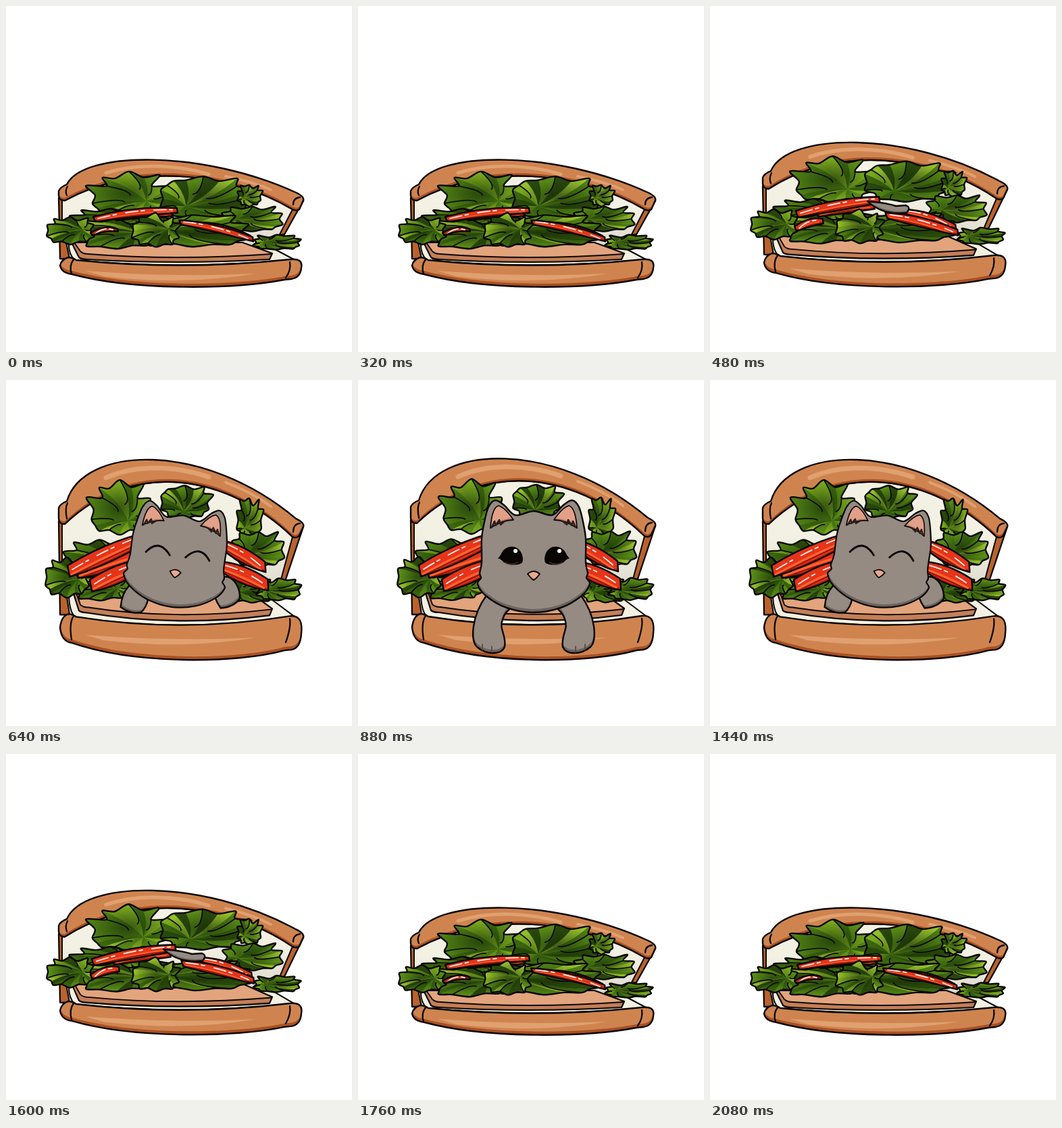
An HTML page that plays this animation: 512 by 512 pixels, repeating every 2.16 s.

```html
<!DOCTYPE html>
<html lang="en">
<head>
<meta charset="utf-8">
<title>Cat sandwich</title>
<style>
html, body { margin: 0; width: 100%; height: 100%; overflow: hidden; background: #fff; }
svg { display: block; width: 100vw; height: 100vh; }
</style>
</head>
<body>
<svg viewBox="0 0 512 512" stroke-linejoin="round" stroke-linecap="round">
  <defs>
    <radialGradient id="deep">
      <stop offset=".1" stop-color="#142a07" stop-opacity=".6"/>
      <stop offset=".9" stop-color="#142a07" stop-opacity="0"/>
    </radialGradient>
    <linearGradient id="crumb" x2="0" y2="1">
      <stop offset=".4" stop-color="#f3f1e4"/>
      <stop offset="1" stop-color="#d3d0c4"/>
    </linearGradient>
  </defs>
  <g id="scene"></g>
</svg>
<script>
const STEP = 80, STEPS = 27;
const INK = '#0b0703', CRUST = '#cf8450', CRUST_DARK = '#aa5022', GLOSS = '#e0a06f';
const GREENS = ['#4f7f14', '#3b660e', '#7aa91e', '#5a8c17', '#29490b', '#94bd2b'];
const scene = document.getElementById('scene');
let clips = 0;

const lerp = (a, b, t) => a + (b - a) * t;

function seeded(seed) {
  let s = seed * 7919;
  return () => (s = (s * 16807 + 11) % 2147483647) / 2147483647;
}

// Closed Catmull-Rom curve through the points
function curve(pts) {
  const n = pts.length, at = i => pts[(i + n) % n];
  return pts.reduce((d, p, i) => {
    const [a, c, e] = [at(i - 1), at(i + 1), at(i + 2)];
    const from = [0, 1].map(j => p[j] + (c[j] - a[j]) / 6);
    const to = [0, 1].map(j => c[j] - (e[j] - p[j]) / 6);
    return d + `C${from} ${to} ${c}`;
  }, 'M' + pts[0]) + 'Z';
}

const fill = (d, color, more = '') => `<path d="${d}" fill="${color}" ${more}/>`;
const line = (d, color = INK, width = 2.3, more = '') =>
  `<path d="${d}" fill="none" stroke="${color}" stroke-width="${width}" ${more}/>`;
const mirror = (body, x = 0) => body + `<g transform="translate(${2 * x}) scale(-1,1)">${body}</g>`;

// Outlined shape with a shaded lower edge and clipped details
function solid(d, color, shade, lift, details = '', width = 2.4) {
  const id = 'clip' + ++clips;
  return `<clipPath id="${id}"><path d="${d}"/></clipPath><g clip-path="url(#${id})">` +
    fill(d, shade) + fill(d, color, `transform="translate(0,${-lift})"`) + details + '</g>' +
    line(d, INK, width);
}

// Ruffled ellipse with streaks fanning out from the middle of the sandwich
function leaf([x, y, rx, ry], seed) {
  const rand = seeded(seed), n = 20;
  const round = v => Math.sign(v) * Math.abs(v) ** .75;
  const pts = Array.from({ length: n }, (_, i) => {
    const a = i / n * 2 * Math.PI;
    const r = 1 + (i % 2 ? .16 : -.22) * rand() * (Math.sin(a) < 0 ? 1.4 : .7);
    return [x + rx * r * round(Math.cos(a)), y + ry * r * round(Math.sin(a))];
  });
  const away = Math.atan2(325 - y, 250 - x);
  const root = [x + rx * .55 * Math.cos(away), y + ry * .55 * Math.sin(away)];
  const bend = p => {
    const dx = p[0] - root[0], dy = p[1] - root[1];
    return [root[0] + dx / 2 - dy * .2, root[1] + dy / 2 + dx * .08];
  };
  let streaks = '', folds = '';
  pts.forEach((p, i) => {
    const q = pts[(i + 1) % n];
    streaks += fill(`M${root}Q${bend(p)} ${p}L${q}Q${bend(q)} ${root}`, GREENS[Math.floor(rand() * GREENS.length)]);
    if (i % 3 === 0) folds += line(`M${p}Q${bend(p)} ${p.map((v, j) => lerp(v, root[j], .6))}`, INK, 1.7);
  });
  const outline = curve(pts);
  return solid(outline, GREENS[0], GREENS[4], 3, streaks + fill(outline, 'url(#deep)') + folds);
}

// Crescent slice between two ends
function tomato([x0, y0, x1, y1, thick]) {
  const mx = (x0 + x1) / 2, my = (y0 + y1) / 2;
  const arc = (k, inset = 0) => `M${x0 + inset},${y0 + thick * k}Q${mx},${my - 9 + thick * k * 1.5} ${x1 - inset},${y1 + thick * k}`;
  const body = `M${x0},${y0}Q${mx},${my - 10} ${x1},${y1}l1,${thick * .7}Q${mx},${my + thick * 1.4 - 8} ${x0 + 3},${y0 + thick * .7}Z`;
  const details = line(arc(.55, 6), '#ff6331', thick * .14) +
    line(arc(.66, 6), '#8f170b', thick * .08) +
    line(arc(.25, 7), '#fff1e8', 1.8, 'stroke-dasharray="18 5 5 14"');
  return solid(body, '#e5341a', '#ad1c0c', 3, details);
}

function lid(y) {
  const left = y(264, 178), right = y(276, 204), innerL = y(288, 212), innerR = y(301, 231);
  const side = y(338, 300), floor = y(374, 347);
  const arch = `C115,${y(214, 95)} 292,${y(213, 88)} 429,${right}`;
  const under = `C330,${y(245, 140)} 190,${y(231, 113)} 87,${innerL}`;
  const back = `M78,${innerL - 4}L80,${floor}H94L412,${side}L440,${right + 12}Z`;
  const inside = `M424,${innerR}${under}L83,${innerL}V${y(320, 275)}L94,${floor}L395,${side + 20}L406,${side - 2}Z`;
  const crust = `M90,${left}${arch}Q444,${right + 7} 439,${right + 14}L434,${right + 25}` +
    `Q430,${innerR + 3} 424,${innerR}${under}Q78,${innerL} 78,${innerL - 8}V${left + 10}Q80,${left + 4} 90,${left}Z`;
  const gloss = line(`M148,${y(247, 143)}C195,${y(232, 122)} 255,${y(235, 126)} 300,${y(249, 142)}`, GLOSS, y(5, 7)) +
    line(`M325,${y(252, 150)}Q365,${y(260, 165)} 392,${y(272, 186)}`, GLOSS, 4);
  return fill(back, '#b8622e') + line(back) + fill(inside, 'url(#crumb)') + line(inside, INK, 2) +
    solid(crust, CRUST, CRUST_DARK, 4, gloss) +
    line(`M91,${left + 3}Q87,${left + 10} 90,${innerL - 8}`) +
    line(`M435,${right + 7}Q425,${right + 8} 425,${innerR - 7}`);
}

function base(y) {
  const front = y(375, 349), ham = y(363, 332), rear = y(350, 306);
  const slab = `M93,${rear}Q92,${front - 8} 102,${front + 1}Q260,${y(391, 375)} 426,${front}L394,${y(358, 325)}Z`;
  const meat = `M97,${rear}L108,${ham + 9}Q112,${ham + 12} 120,${ham + 12}Q250,${y(383, 366)} 390,${y(375, 348)}L394,${y(366, 338)}L350,${rear}Z`;
  const rim = `M101,${rear}L110,${ham}Q114,${ham + 4} 122,${ham + 4}Q250,${y(377, 356)} 393,${y(367, 339)}`;
  const crust = `M92,${front - 3}Q98,${front - 3} 104,${front + 1}Q260,${y(392, 375)} 420,${front}` +
    `Q440,${front - 2} 437,${y(387, 374)}Q436,${y(402, 397)} 422,${y(404, 399)}L412,${y(405, 400)}` +
    `C340,${y(419, 420)} 190,${y(422, 421)} 98,${y(397, 389)}Q82,${y(395, 387)} 80,${y(384, 366)}Q82,${front} 92,${front - 3}Z`;
  const g = y(392, 377);
  const gloss = fill(`M118,${g}Q250,${g + 10} 370,${g + 4}Q260,${g + 22} 145,${g + 8}Z`, GLOSS);
  return fill(slab, '#f2f1e3') + line(slab, INK, 2) +
    solid(meat, '#c47f58', '#b06c46', 2, fill(rim + `L350,${rear}Z`, '#e2a47d'), 2.2) + line(rim, INK, 1.9) +
    solid(crust, CRUST, CRUST_DARK, 5, gloss) +
    line(`M100,${front}Q93,${front + 10} 97,${y(396, 384)}`) +
    line(`M420,${front + 4}Q422,${front + 16} 414,${y(402, 388)}`);
}

// Each part is [x, y, ...size] when shut and when open
function filling(u) {
  const blend = (shut, open) => shut.map((v, i) => lerp(v, open[i], i % 2 ? u : u * u));
  const slice = (shut, open) => {
    const p = shut.map((v, i) => lerp(v, open[i], i % 2 || i === 4 ? u : u * u));
    return tomato(p);
  };
  return leaf(blend([182, 280, 56, 29], [168, 190, 43, 36]), 3) +
    leaf(blend([292, 285, 64, 30], [264, 180, 35, 23]), 8) +
    leaf(blend([360, 281, 17, 15], [360, 206, 18, 30]), 5) +
    leaf(blend([365, 315, 42, 18], [374, 250, 36, 26]), 6) +
    leaf(blend([155, 318, 55, 16], [138, 266, 48, 27]), 14) +
    leaf(blend([275, 333, 82, 23], [366, 312, 34, 17]), 9) +
    leaf(blend([165, 337, 62, 20], [140, 307, 44, 17]), 11) +
    leaf(blend([95, 332, 34, 19], [90, 291, 31, 28]), 12) +
    leaf(blend([400, 350, 33, 10], [403, 310, 31, 15]), 4) +
    slice([160, 311, 245, 305, 9], [102, 276, 200, 247, 24]) +
    slice([129, 312, 253, 299, 10], [90, 274, 200, 226, 24]) +
    slice([125, 336, 165, 330, 5], [124, 295, 200, 265, 25]) +
    slice([285, 320, 362, 340, 7], [320, 236, 384, 268, 22]) +
    slice([256, 317, 365, 342, 9], [320, 268, 388, 294, 24]) +
    (u < .5 ? leaf(blend([222, 333, 34, 22], [222, 310, 34, 22]), 16) : '');
}

const fur = (d, lift = 5) => solid(d, '#958b83', '#6d6560', lift);

// Drawn around the middle of the face; the left half is mirrored
function head(smiling) {
  const half = [[-27, -69], [-44, -84], [-57, -91], [-67, -81], [-73, -59], [-77, -34],
    [-77, 1], [-80, 17], [-78, 24], [-83, 33], [-70, 51], [-40, 68]];
  const other = half.map(([x, y]) => [-x, y]).reverse();
  const ear = solid('M-64,-50Q-62,-80 -52,-83Q-42,-80 -30,-62Q-46,-62 -64,-50Z', '#e2a088', '#c27d68', 3, '', 1.8) +
    line('M-62,-51l4,-9l2,6l5,-8l2,7l6,-5', '#2a211d', 2.6);
  const open = fill('M-53,-5Q-49,-9 -47,-14C-40,-26 -22,-26 -17,-10Q-14,2 -20,3C-28,6 -42,5 -47,-2Q-50,-5 -53,-5Z', '#090504') +
    line('M-42,1q9,5 18,0', '#3b2a24', 2);
  const eyes = smiling ? line('M-52,-8Q-34,-33 -13,-8', INK, 3.2) : open;
  const sparks = [-27, 38].map(x => `<circle cx="${x}" cy="-16" r="3" fill="#fff"/>`).join('');
  const nose = solid('M-9,18Q0,10 9,18Q3,26 0,27Q-3,26 -9,18Z', '#e8a98f', '#c48470', 2, '', 1.9);
  return fur(curve([[0, -75], ...half, [0, 75], ...other])) + mirror(ear + eyes) + (smiling ? '' : sparks) + nose;
}

const place = (body, x, y, turn = 0, size = 1) =>
  `<g transform="translate(${x},${y}) rotate(${turn}) scale(${size})">${body}</g>`;
const paw = (x, y, turn) => place(fur('M-16,20C-22,-8 -12,-24 2,-22C22,-20 22,8 15,18Q2,26 -16,20Z', 4), x, y, turn);

const cats = {
  hidden: () => '',
  sliver: () => fur('M233,289Q260,291 275,296L290,295Q298,298 291,306Q255,310 233,289Z', 3),
  smiling: () => paw(191, 322, 18) + paw(325, 313, -22) + place(head(true), 253, 268, 8, .91),
  leaning: () => {
    const arm = fur('M-70,50C-92,80 -94,116 -84,126C-70,138 -48,138 -43,126C-40,108 -52,100 -46,85Q-43,74 -30,66Z') +
      line('M-76,131v-9M-62,134v-9', '#4f4742', 1.6);
    return place(mirror(arm) + head(false), 260, 269);
  }
};

function draw(open, cat) {
  const y = (shut, wide) => lerp(shut, wide, open);
  clips = 0;
  scene.innerHTML = lid(y) + base(y) + filling(open) + cats[cat]();
}

// The loop opens, holds and closes again in mirrored steps
function pose(step) {
  const k = Math.min(step, STEPS - 1 - step);
  if (k < 6) return [0, 'hidden'];
  if (k < 7) return [.23, 'sliver'];
  return k < 9 ? [.985, 'smiling'] : [1, 'leaning'];
}

const start = performance.now();
let shown = -1;
function tick() {
  const step = Math.floor((performance.now() - start) / STEP) % STEPS;
  if (step !== shown) draw(...pose(shown = step));
  requestAnimationFrame(tick);
}
tick();
</script>
</body>
</html>
```
